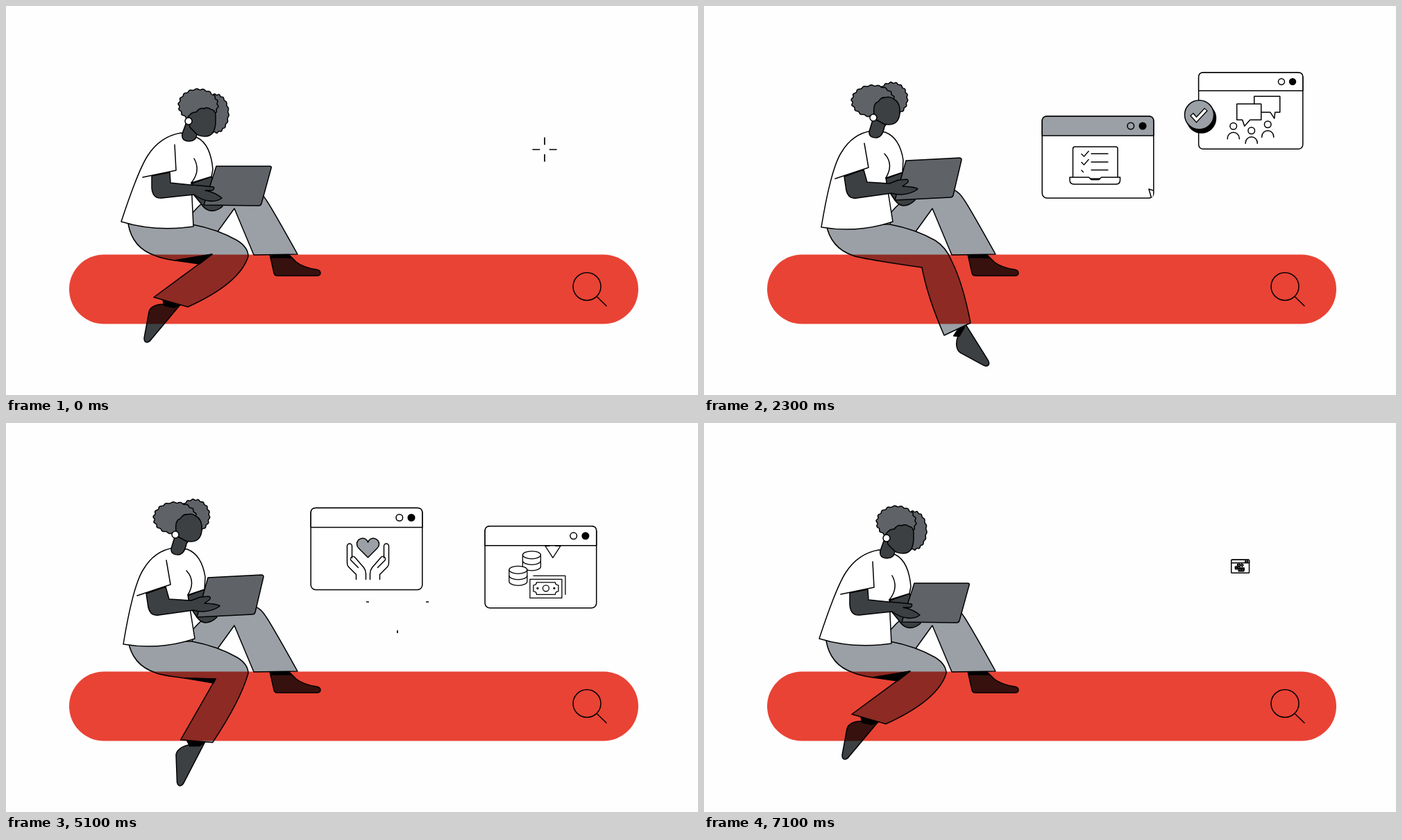
An HTML page for the animation above (7200 ms loop, 997 by 561 pixels).

```html
<!DOCTYPE html>
<html lang="en">
<head>
<meta charset="utf-8">
<title>Search bar scene</title>
<style>
html, body { margin: 0; width: 100%; height: 100%; overflow: hidden; background: #fefefe; }
svg { display: block; width: 997px; height: 561px; }
.ln { fill: none; stroke: #000; stroke-width: 1.5; stroke-linejoin: round; stroke-linecap: round; }
.win * { vector-effect: non-scaling-stroke; }
.win #ticks * { vector-effect: none; }
.pants { fill: #9aa0a6; }
.skin { fill: #3c4043; }
.hair { fill: #5f6368; }
.white { fill: #fff; }
.thin { stroke-width: 1.3; }
.bar { fill: #ea4335; mix-blend-mode: multiply; }
</style>
</head>
<body>
<svg viewBox="0 0 997 561" xmlns="http://www.w3.org/2000/svg">
  <defs>
    <clipPath id="pane"><rect x="-79.5" y="-31" width="159" height="89.3" rx="4"/></clipPath>
  </defs>

  <g class="ln">
    <path class="skin" d="M380 358 L386 385 Q387 389 391 389 H448 Q453 389 453 385 Q453 381 447 380 Q428 377 418 369 L407 358Z"/>
    <path fill="#000" d="M381 358 H406 L411 363 H382Z"/>
    <path class="pants" d="M268 320 L269 298 Q300 262 340 262 Q362 260 373 277 Q380 286 420 358 L357 359 L329 292 L303 328Z"/>
    <path id="farArm" class="skin"/>
    <g id="foot">
      <path class="skin" d="M-10 1 Q-20 1 -25 4 Q-31 7 -32 12 L-39 50 Q-39 56 -35 56 Q-32 56 -29 52 L12 3Z"/>
      <path fill="#000" d="M-12 -5 L14 2 L4 6 L-10 3Z"/>
    </g>
    <path id="leg" class="pants"/>
    <path id="fold" fill="#000"/>
    <path id="shirt" class="white"/>
    <path id="seams"/>
    <path id="laptop" class="hair"/>
    <path id="arm" class="skin"/>
    <path id="hairBack" class="hair"/>
    <path id="hairTop" class="hair"/>
    <path id="neck" class="skin"/>
    <path id="face" class="skin"/>
    <circle id="earring" class="white" r="5"/>
  </g>

  <rect class="bar" x="91" y="358.5" width="820" height="100" rx="50"/>
  <g id="lens" class="ln">
    <circle cx="837" cy="404.5" r="20"/>
    <path d="M851 419 L865 432.5"/>
  </g>

  <path id="sparks" class="ln" style="stroke-width:1.7;stroke-linecap:butt"/>

  <g id="chat" class="ln win">
    <g class="frame"></g>
    <g transform="scale(1.07)">
      <path class="white" d="M5 -21 H42 V2 H35 L34 11 L28 2 H5Z"/>
      <path class="white" d="M-20 -10 H15 V13 H-1 L-9 22 L-12 13 H-20Z"/>
      <g id="crowd"></g>
    </g>
  </g>
  <g id="badge" class="ln">
    <circle cx="3" cy="5" r="21" fill="#000"/>
    <circle r="21" class="pants"/>
    <g style="stroke-linecap:butt;stroke-linejoin:miter">
      <path d="M-11 -1 L-4 7 L10 -8" style="stroke-width:6.5"/>
      <path d="M-10.2 0 L-4 7 L9.2 -7.2" style="stroke:#fff;stroke-width:3.8"/>
    </g>
  </g>

  <g id="list" class="ln win">
    <g class="frame grey"></g>
    <g clip-path="url(#pane)"><g id="tasks">
      <rect class="white" x="-36" y="-15" width="64.5" height="46" rx="3"/>
      <path class="thin" d="M-9.5 -5 H14.5 M-9.5 7 H14.5 M-9.5 18.5 H14.5"/>
      <g id="ticks" class="thin"></g>
      <path class="white" d="M-40.5 29 H-13 L-9.5 32.5 H1.5 L5 29 H32 V33 Q32 39 26 39 H-34 Q-40.5 39 -40.5 33Z"/>
      <path id="cursor" class="white" d="M0 0 L21 7 L13 11 L20 19 L17 22 L9 14.5 L6 21Z"/>
    </g></g>
  </g>

  <g id="care" class="ln win">
    <g class="frame"></g>
    <g transform="translate(2 0)">
      <path id="palm" d="M-17 44 V37 L-28 26 Q-30 24 -30 20 V-4 A3.5 3.5 0 0 1 -23 -4 V13 M-14 27 L-24 17 A3.3 3.3 0 0 1 -19 12 L-6 27 Q-3 31 -3 36 V44"/>
      <use href="#palm" transform="scale(-1 1)"/>
      <path id="heart" class="pants" d="M0 10 L-13 -3 Q-16 -6 -16 -9 A8.2 8.2 0 0 1 0 -12 A8.2 8.2 0 0 1 16 -9 Q16 -6 13 -3Z"/>
    </g>
  </g>

  <g id="money" class="ln win">
    <g class="frame"></g>
    <g class="thin" style="stroke-linecap:butt">
      <g id="coins"></g>
      <path d="M-11 12.5 H35.5 V40"/>
      <rect class="white" x="-15.5" y="17.5" width="46" height="27"/>
      <path d="M-6 22 H21 Q21 26 25.5 26 V35 Q21 35 21 39.5 H-6 Q-6 35 -10.5 35 V26 Q-6 26 -6 22Z"/>
      <circle cx="7.5" cy="30.5" r="4.5"/>
      <circle cx="-4.5" cy="30.5" r="1" fill="#000"/>
      <circle cx="19.5" cy="30.5" r="1" fill="#000"/>
      <g clip-path="url(#pane)">
        <path id="arrow" d="M21.5 -22 V-13.5 H28.5 L17.5 3.5 L6.5 -13.5 H12.5 V-48"/>
      </g>
    </g>
  </g>
</svg>

<script>
const LOOP = 7200, HALF = 3500, STEP = 100;
const $ = id => document.getElementById(id);
const clamp = x => Math.max(0, Math.min(1, x));
const span = (t, a, d) => clamp((t - a) / d);
const smooth = x => (1 - Math.cos(Math.PI * clamp(x))) / 2;
const easeOut = x => 1 - (1 - x) ** 3;
const lerp = (a, b, k) => a + (b - a) * k;
const set = (id, name, v) => $(id).setAttribute(name, v);
const place = (id, x, y, extra = '') => set(id, 'transform', `translate(${x} ${y}) ${extra}`);

// Two paths with the same commands, mixed number by number
const NUM = /-?\d+(\.\d+)?/g;
function mix([a, b], k) {
  const to = b.match(NUM);
  let i = 0;
  return a.replace(NUM, n => lerp(+n, +to[i++], k).toFixed(2));
}

// Each part: looking down, looking up
const parts = {
  shirt: [
    'M252 183 Q222 188 204 216 Q190 238 166 311 Q215 326 270 318 L267 255 L296 246 L298 236 Q295 200 276 190Z',
    'M242 180 Q214 184 198 211 Q183 234 169 319 Q222 328 272 311 L262 248 L286 240 L287 222 Q282 190 261 182Z'],
  seams: [
    'M197 247 L245 237 L243 200 M271 220 Q281 238 267 255',
    'M189 249 L237 233 L231 198 M260 213 Q274 228 262 248'],
  laptop: [
    'M303 231 L380 231 Q383 231 382 234 L368 285 Q367 288 364 288 L285 287Z',
    'M291 223 L368 219 Q371 219 371 222 L359 273 Q358 276 355 276 L275 280Z'],
  farArm: [
    'M268 256 L296 246 L312 289 Q303 297 293 295 Q286 293 281 285 L267 268Z',
    'M262 249 L286 240 L304 280 Q296 288 287 288 Q280 287 275 280 L263 262Z'],
  neck: [
    'M262 162 L254 184 Q252 195 264 195 Q274 195 275 185 L290 175Z',
    'M245 158 L238 181 Q237 190 248 190 Q257 190 260 174 L266 165Z'],
  face: [
    'M262 160 Q268 152 274 153 Q279 146 285 148 Q290 145 295 149 Q302 150 302 158 L302 168 Q301 188 287 188 Q279 188 275 185 L265 175Z',
    'M245 156 Q243 140 251 138 Q255 131 261 132 Q268 130 273 134 Q281 138 282 148 L282 156 Q280 171 266 171 Q262 171 259 170 L246 163Z']
};
// Centre and radii of each tuft, down and up
const tufts = {
  hairBack: [[302, 155, 18.5, 27.5], [271, 134, 22, 23.5]],
  hairTop: [[277, 143, 28, 23], [243.5, 137, 30.5, 22.5]]
};
const armPose = [
  'M210 245 L210 262 Q211 278 224 277 L271 272 Q282 280 292 281 Q303 283 311 277 Q302 269 287 266 L297 266 Q301 264 299 261 L280 259 L266 258 L237 255 L236 240Z',
  'M202 246 L205 266 Q208 279 220 277 L270 270 Q277 272 284 272 Q299 271 308 264 Q306 261 286 260 L293 255 Q296 251 292 250 L280 251 L267 256 L235 254 L230 236Z'];

function curls(cx, cy, rx, ry) {
  let d = '';
  for (let i = 0; i < 180; i++) {
    const a = i * Math.PI / 90, w = 1 + 0.035 * Math.sin(18 * a);
    d += (i ? 'L' : 'M') + (cx + rx * w * Math.cos(a)).toFixed(1) + ' ' + (cy + ry * w * Math.sin(a)).toFixed(1);
  }
  return d + 'Z';
}

// Swinging shin: positions around the knee at four stages of the swing
const KNEE = [335, 370], STAGE = [0, 0.149, 0.27, 1];
const shin = {
  rear: [[243, 367], [250, 366], [258, 368], [314, 377]],
  bend: [[297, 358], [302, 367], [302, 369], [314, 377]],
  under: [[279, 372], [296, 375], [299, 375], [314, 377]],
  back: [[255, 389], [268, 406], [277, 413], [322, 420]],
  hemB: [[213, 420], [234, 445], [252, 457], [346, 475]],
  hemF: [[262, 434], [283, 451], [298, 461], [384, 457]],
  front: [[337, 400], [337, 398], [338, 400], [373, 400]],
  cap: [[349, 361], [349, 361], [349, 361], [357, 368]],
  ankle: [[238, 429], [258, 450], [274, 461], [368, 466]]
};
const footTurn = [0, -4.2, -12.7, -72];
const polar = ([x, y]) => [Math.atan2(KNEE[0] - x, y - KNEE[1]), Math.hypot(x - KNEE[0], y - KNEE[1])];

function drawLeg(p) {
  const i = p < STAGE[1] ? 0 : p < STAGE[2] ? 1 : 2;
  const k = (p - STAGE[i]) / (STAGE[i + 1] - STAGE[i]);
  const at = name => {
    const a = polar(shin[name][i]), b = polar(shin[name][i + 1]);
    const ang = lerp(a[0], b[0], k), r = lerp(a[1], b[1], k);
    return (KNEE[0] - r * Math.sin(ang)).toFixed(2) + ' ' + (KNEE[1] + r * Math.cos(ang)).toFixed(2);
  };
  set('leg', 'd', `M176 314 Q182 349 215 360 Q224 364 ${at('rear')} L${at('bend')} Q${at('back')} ${at('hemB')}
    L${at('hemF')} Q${at('front')} ${at('cap')} Q349 348 333 338 Q305 322 268 315Z`);
  set('fold', 'd', `M${at('rear')} L${at('bend')} L${at('under')}Z`);
  set('foot', 'transform', `translate(${at('ankle')}) rotate(${lerp(footTurn[i], footTurn[i + 1], k)})`);
}

function drawBody(t) {
  const second = t >= HALF, u = second ? t - HALF : t;
  const from = second ? 0.27 : 0, to = second ? 0 : 0.27;
  const down = smooth(span(u, 2900, 300));
  const k = lerp(lerp(from, 1, smooth(span(u, 600, 900))), to, down);
  for (const id in parts) set(id, 'd', mix(parts[id], k));
  for (const id in tufts) {
    const [a, b] = tufts[id];
    set(id, 'd', curls(...a.map((v, i) => lerp(v, b[i], k))));
  }
  place('earring', lerp(263, 244, k), lerp(166, 161, k));
  set('arm', 'd', mix(armPose, k));
  const lag = 3 * span(u, 600, 400) * (1 - span(u, 1400, 200));
  place('arm', lag, -lag / 2);
  drawLeg(clamp(smooth(span(u, 1240, 1040)) - smooth(span(u, 2340, 760))));
}

// Centre, reach, birth
const sparks = [[776, 207, 25, 7100], [834.5, 260.5, 27.5, 1359], [789, 150, 45, 3210],
  [713.5, 157, 14, 3274], [564, 258, 45, 4822], [526, 179, 45, 6690]];

function drawSparks(t) {
  let d = '';
  for (const [x, y, reach, born] of sparks) {
    const a = ((t - born + LOOP) % LOOP) / 300;
    if (a <= 0 || a >= 1) continue;
    const inn = reach * a ** 1.2, out = reach * easeOut(a);
    for (const [dx, dy] of [[1, 0], [-1, 0], [0, 1], [0, -1]])
      d += `M${x + dx * inn} ${y + dy * inn}L${x + dx * out} ${y + dy * out}`;
  }
  set('sparks', 'd', d);
}

function pop(id, t, open, close, x, y, base = 1, shut = 300) {
  const s = base * easeOut(span(t, open, 500)) * (1 - span(t, close, shut) ** 3);
  $(id).style.display = s > 0.01 ? '' : 'none';
  place(id, x, y, `scale(${Math.max(s, 0.01)})`);
  return s;
}

function drawWindows(t) {
  const drift = t - 1500;
  pop('chat', t, 300, 2910, 787 + drift * 0.0009, 152 - drift * 0.001, 0.935);
  pop('badge', t, 450, 3050, 715 - 1.5 * span(t, 1500, 800), 157, 1, 224);

  const sink = 40 * smooth(span(t, 3900, 600));
  const s = pop('list', t, 1340, 4525, 567.5 - 3.5 * span(t, 2300, 1300), 220 - 2 * span(t, 1500, 600) + sink);
  const grow = t < 2000 ? 1 / Math.max(s, 0.05) : 1;
  const rise = 83 * (1 - easeOut(span(t, 1300, 600)));
  set('tasks', 'transform', `scale(${grow}) translate(0 ${rise})`);
  [...$('ticks').children].forEach((el, i) => {
    const q = span(t, 1780 + i * 230, 200);
    el.style.display = q ? '' : 'none';
    el.setAttribute('stroke-dasharray', `${q} 2`);
  });
  const c = smooth(span(t, 2200, 550));
  place('cursor', lerp(78, 20.5, c), lerp(48, 22, c));

  const up = (t - 5100) / 800;
  pop('care', t, 4150, 6390, 519.5 + 3.5 * up, 181.5 - 1.5 * up);
  place('heart', 0, 1.25 + 1.25 * Math.cos(up * Math.PI));

  pop('money', t, 4480, 6817, 773.3 - 1.6e-6 * (t - 6450) ** 2, 207.8 - 0.4 * up);
  place('arrow', 0, -38 * (1 - span(t, 4800, 900)) ** 2);
}

function drawLens(t) {
  let s = 1;
  for (const start of [150, 2950, 5750]) {
    const w = Math.sin(2 * Math.PI * span(t, start, 600));
    s += w * (w > 0 ? 0.08 : 0.05);
  }
  set('lens', 'transform', `translate(840.5 408.5) scale(${s}) translate(-840.5 -408.5)`);
}

// Repeated static pieces
document.querySelectorAll('.frame').forEach(g => {
  const grey = g.classList.contains('grey');
  g.innerHTML = `<rect class="white" x="-80.3" y="-59" width="160.6" height="118" rx="7"/>
    <path class="${grey ? 'pants' : 'white'}" d="M-80.3 -31 V-52 Q-80.3 -59 -73.3 -59 H73.3 Q80.3 -59 80.3 -52 V-31Z"/>
    <circle cx="47.3" cy="-45" r="4.8"/>
    <circle cx="64.5" cy="-45" r="4.8" fill="#000"/>`;
});
$('crowd').innerHTML = [[-25, 22], [1, 28.5], [24.5, 19.5]].map(([x, y]) =>
  `<g transform="translate(${x} ${y})"><circle r="4.8"/><path d="M-8.5 18.5 V17.5 A8.5 8.5 0 0 1 8.5 17.5 V18.5"/></g>`).join('');
$('ticks').innerHTML = [-5, 7, 18.5].map(y =>
  `<path pathLength="1" style="stroke-linecap:butt" d="M-24 ${y} L-20 ${y + 4} L-13 ${y - 4}"/>`).join('');
$('coins').innerHTML = [[-13, -17.5], [-32.5, 4]].map(([x, y]) =>
  `<g transform="translate(${x} ${y})"><path class="white" d="M-13 0 V17 A13 5.5 0 0 0 13 17 V0"/>
   <path d="M-13 8.5 A13 5.5 0 0 0 13 8.5"/><ellipse class="white" rx="13" ry="5.5"/></g>`).join('');

function draw(now) {
  const t = Math.floor(now / STEP) * STEP % LOOP;
  drawBody(t);
  drawSparks(t);
  drawWindows(t);
  drawLens(t);
}
const begin = performance.now();
function tick() {
  draw(performance.now() - begin);
  requestAnimationFrame(tick);
}
tick();
</script>
</body>
</html>
```
